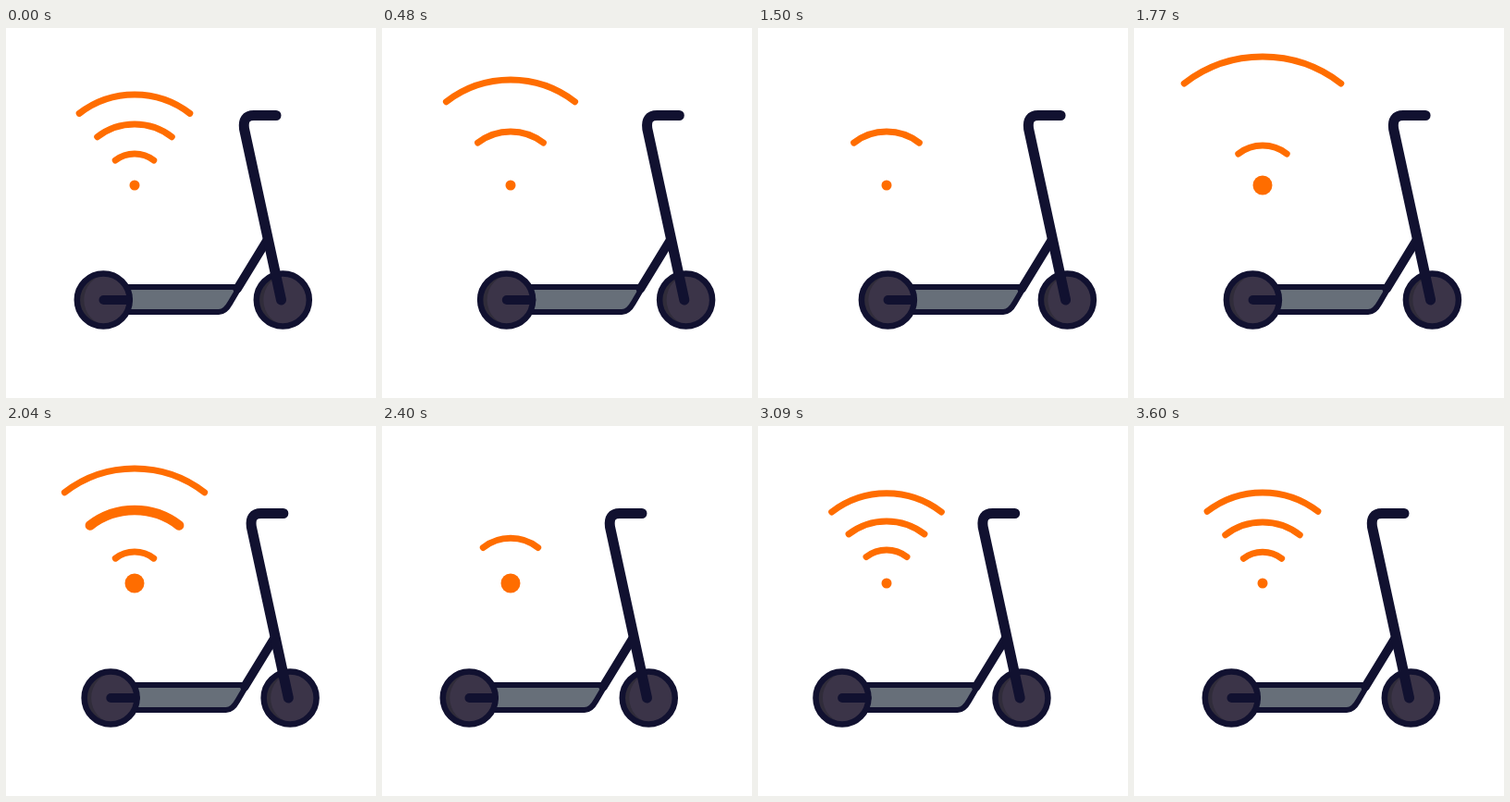
Write an HTML page that moves like this. It is 400 px wide and 400 px high and loops after 3630 ms.

```html
<!DOCTYPE html>
<html lang="en">
<head>
<meta charset="utf-8">
<title>Connected scooter</title>
<style>
html, body { margin: 0; width: 100%; height: 100%; overflow: hidden; background: #fff; }
svg { display: block; width: 100vw; height: 100vh; }
.line { fill: none; stroke: #111130; stroke-linecap: round; stroke-linejoin: round; }
.deck { fill: #676f79; }
</style>
</head>
<body>
<svg viewBox="0 0 400 400">
  <defs>
    <g id="wheel">
      <circle r="28.5" fill="#302c3a"/>
      <ellipse cx="4" rx="25" ry="27" fill="#3b3448"/>
      <circle class="line" r="28.5" stroke-width="6.5"/>
    </g>
  </defs>
  <g id="signal" transform="translate(139 170)" fill="none" stroke="#ff6d00" stroke-linecap="round">
    <circle id="dot" fill="#ff6d00" stroke="none"/>
  </g>
  <g id="scooter">
    <path class="line deck" d="M120 280H252.500L242.500 297Q237 307 230 307H120Z" stroke-width="6"/>
    <path class="line" d="M283 228L250 282" stroke-width="9.500"/>
    <use href="#wheel" x="105.300" y="294"/>
    <use href="#wheel" x="299.300" y="294"/>
    <path class="line" d="M105.500 294H132" stroke-width="10"/>
    <path class="line" d="M297.500 294L257.500 109Q255.500 94.500 268 94.500H292" stroke-width="11"/>
  </g>
</svg>
<script>
const LOOP = 3630, STEP = 30;
const SPEED = 0.3, MAX_R = 139.5, HALF_ANGLE = 37.6 * Math.PI / 180;
const LINE = 7, BOLD = 10.5;

const clamp = u => Math.min(1, Math.max(0, u));
const smooth = u => (1 - Math.cos(Math.PI * clamp(u))) / 2;

function bezier(x1, y1, x2, y2) {
  const at = (a, b, s) => 3 * a * s * (1 - s) ** 2 + 3 * b * s * s * (1 - s) + s ** 3;
  return u => {
    let lo = 0, hi = 1;
    for (let i = 0; i < 24; i++) {
      const mid = (lo + hi) / 2;
      if (at(x1, x2, mid) < u) lo = mid; else hi = mid;
    }
    return at(y1, y2, lo);
  };
}

// Forward with a quick start, back past the middle, then home.
const dash = bezier(0.2, 0.05, 0.23, 1), home = bezier(0.3, 0.1, 0.67, 1);
function ride(t) {
  if (t < 1165) return 41 * dash(t / 1165);
  if (t < 2840) return 41 - 62 * smooth((t - 1165) / 1675);
  return 21 * home(clamp((t - 2840) / 760)) - 21;
}

// Waves are sent in bursts; the last burst springs back to the resting arcs.
const bursts = [
  { start: 659, count: 3, gap: 139 },
  { start: 1307, count: 1, gap: 0 },
  { start: 1627, count: 3, gap: 150, bold: 1 },
  { start: 2296, count: 3, gap: 97, rests: true }
];

const restRadius = i => 98 - 32 * i;
const leave = i => t => restRadius(i) + SPEED * Math.max(0, t - 240 - 80 * i);
const travel = birth => t => SPEED * (t - birth);
const spring = (birth, rest) => t => {
  const x = Math.max(0, t - birth) * 0.00627;
  return rest * (1 - Math.exp(-0.7 * x) * Math.cos(x));
};

const byId = id => document.getElementById(id);
const signal = byId("signal"), dot = byId("dot"), scooter = byId("scooter");
const arcs = [];

function addArc(radius, width = LINE) {
  const path = document.createElementNS("http://www.w3.org/2000/svg", "path");
  path.setAttribute("stroke-width", width);
  arcs.push({ path: signal.insertBefore(path, dot), radius });
}

for (let i = 0; i < 3; i++) addArc(leave(i));
for (const { start, count, gap, bold, rests } of bursts) {
  for (let i = 0; i < count; i++) {
    const birth = start + gap * i;
    addArc(rests ? spring(birth, restRadius(i)) : travel(birth), i === bold ? BOLD : LINE);
  }
}

function arcPath(r) {
  if (r < 5 || r > MAX_R) return "";
  const x = r * Math.sin(HALF_ANGLE), y = -r * Math.cos(HALF_ANGLE);
  return `M${-x} ${y}A${r} ${r} 0 0 1 ${x} ${y}`;
}

// The dot swells while a burst is being sent.
function dotRadius(t) {
  const swell = bursts.map(({ start, count, gap }) => {
    const end = start + gap * (count - 1) + 195;
    return smooth((t - start + 100) / 80) * smooth((end - t) / 80);
  });
  return 5.5 + 5 * Math.max(...swell);
}

function draw(t) {
  scooter.setAttribute("transform", `translate(${ride(t)} 0)`);
  dot.setAttribute("r", dotRadius(t));
  for (const { path, radius } of arcs) path.setAttribute("d", arcPath(radius(t)));
}

const begin = performance.now();
function tick() {
  const t = (performance.now() - begin) % LOOP;
  draw(Math.floor(t / STEP) * STEP);
  requestAnimationFrame(tick);
}
draw(0);
requestAnimationFrame(tick);
</script>
</body>
</html>
```
